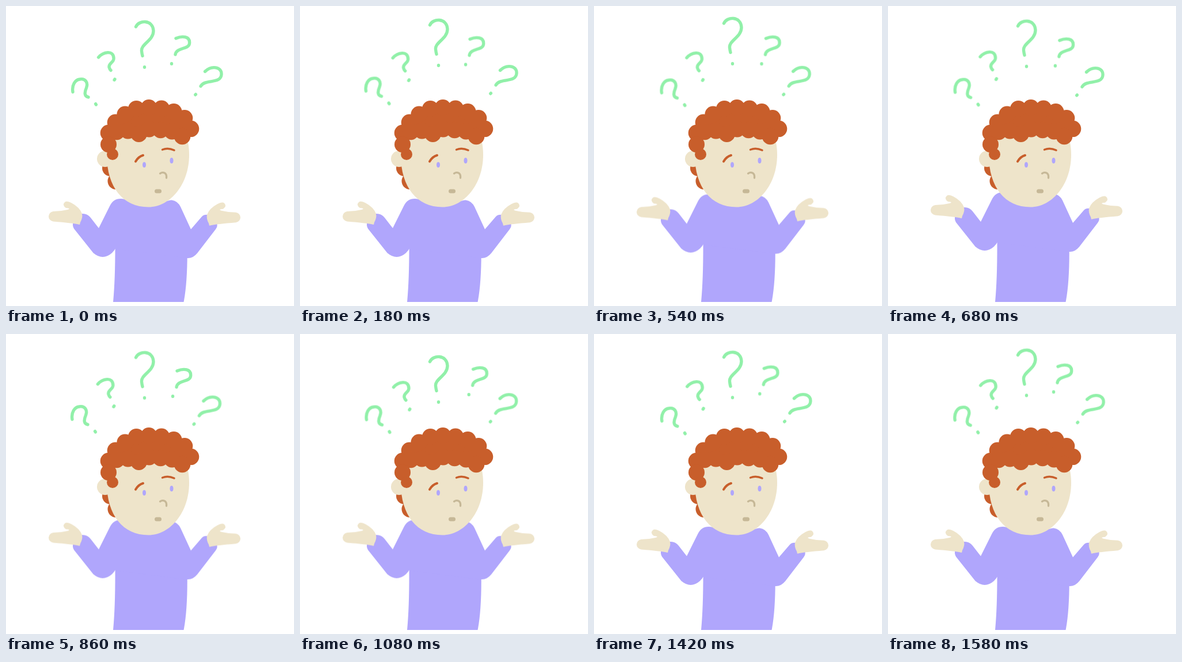
An HTML page that plays this animation: 500x520 px, repeating every 1.6 s.

```html
<!DOCTYPE html>
<html lang="en">
<head>
<meta charset="utf-8">
<title>Shrug</title>
<style>
  html, body { margin: 0; width: 100%; height: 100%; overflow: hidden; background: #fff; }
  svg { display: block; width: 500px; height: 520px; }
  .skin { fill: #eee4ca; }
  .hair { fill: #c85e2b; }
  .shirt { fill: #b0a6fc; }
  .line, .curls { stroke-linecap: round; stroke-linejoin: round; }
  .line { fill: none; }
  .brow { stroke: #c85e2b; }
  .nose { stroke: #c6b897; }
  .mark { stroke: #91f0a9; stroke-width: 5.4; }
  /* Zero-length round dashes make a row of evenly spaced curls */
  .curls { stroke: #c85e2b; stroke-width: 28.6; stroke-dasharray: 0 1; }
</style>
</head>
<body>
<svg viewBox="0 0 500 520">
  <defs>
    <path id="hand" d="M82 356Q95 356 107 353Q112 351.500 108 350.500L104 350Q97 345 102 340Q106 337 114 341.500Q128 349 132 360Q133.500 367 129 375L128 379Q115 376 82 373.500Q74 371.500 74 364.500Q75 357 82 356Z"/>
  </defs>
  <path class="shirt" d="M186 513Q190 470 189.500 405H314.500Q316 475 308.500 513Z"/>
  <g id="body">
    <path class="shirt" d="M180 347Q186 334 199 334Q206 334 213 338L280 338Q284 336 288 336.500Q298 338 303 348L321 387L340 365Q344 361 350 362L366 376Q368 382 364 387L332 428.500Q324 438 314.500 437L189.500 421Q188 424 184 428Q168 442 151.500 428L118 386Q114.500 380 117 374L131 360Q141 359 147 367L161 385Z"/>
    <use href="#hand" class="skin"/>
    <use href="#hand" class="skin" transform="matrix(-1 0 0 1 481 1.8)"/>
  </g>
  <g class="hair">
    <circle cx="181" cy="281" r="14"/>
    <circle cx="191" cy="303.500" r="14.500"/>
  </g>
  <circle class="skin" cx="172" cy="265" r="14"/>
  <path class="skin" d="M247 348.500C203 348.500 175 314 175 258C175 208 208 168 247 168C286 168 318 208 318 258C318 308 286 348.500 247 348.500Z"/>
  <g class="hair">
    <path class="curls" pathLength="8.010" d="M178 220C183 208 198 188 227 178C262 172 315 181 321 213"/>
    <path class="curls" pathLength="6.010" d="M306 226L288 217L249 213L230 222L208 215L192 218"/>
    <circle cx="178" cy="240" r="14"/>
    <circle cx="185" cy="257" r="10"/>
  </g>
  <ellipse class="shirt" cx="240" cy="275.300" rx="3" ry="4.700"/>
  <ellipse class="shirt" cx="287.500" cy="268" rx="3" ry="4.900"/>
  <path class="line brow" stroke-width="4" d="M225 269.500Q230 261 238 258.800"/>
  <path class="line brow" stroke-width="3.500" d="M271.500 249Q281 245 292 250"/>
  <path class="line nose" stroke-width="3.300" d="M267.500 290.300C272 287 279.500 288.500 278.500 298"/>
  <path class="line nose" stroke-width="7" d="M261.500 321H266.500"/>
  <g id="marks" class="line mark">
    <path d="M116 149C114 137 120 128 128 127C138 125 143 133 139.500 142C136 150 136 157 143 158M155.600 169.700l.8 1.200"/>
    <path d="M160.500 89C168 80 187 75 187 91C187 98 178 99 179 106Q180 110 182 111.500M188.900 126.800l-.8 1.400"/>
    <path d="M225.500 36C230.500 24 255 23 256 43C256 60 234 66 235.500 78Q236 83 237 86.500M240.500 105.700v.6"/>
    <path d="M295 56C306 51.500 320 52 318.500 65C317 76 296 71 294 84M287.500 99.700v.6"/>
    <path d="M345.500 113.500C356 103 374.500 104.500 374 118.500C373 136 345 126 338 139M329.300 153.200l-.6 .6"/>
  </g>
</svg>
<script>
const LOOP = 1600;

// Each key is [ms, x, y]; every part starts and ends the loop at rest.
function move(el, keys, easing = 'linear') {
  const frames = [[0, 0, 0], ...keys, [LOOP, 0, 0]].map(([t, x, y]) => ({
    offset: t / LOOP, transform: `translate(${x}px, ${y}px)`, easing
  }));
  el.animate(frames, { duration: LOOP, iterations: Infinity });
}

// Swing along one direction between turning points [ms, distance].
const swing = (dx, dy, ...turns) => turns.map(([t, d]) => [t, d * dx, d * dy]);

const drifts = [
  swing(1, 1, [240, -2], [560, 1.7], [980, -2.2], [1300, 3.1]),
  swing(.5, .87, [400, 2.7], [840, -3], [1160, 6]),
  swing(0, 1, [480, -8], [1080, 12]),
  [[180, 0, 1.5], [540, 3.5, .2], [860, 2, 8], [1080, 5.7, 5], [1280, .5, 6.5]],
  swing(1, -1, [250, 2.8], [860, -2.6], [1210, 4.1])
];
[...document.getElementById('marks').children].forEach((mark, i) => move(mark, drifts[i]));

// Shoulders rise, hold, then drop.
const LIFT = -11.7;
move(document.getElementById('body'),
  swing(0, 1, [200, 0], [780, LIFT], [1080, LIFT], [1410, 0]), 'ease-in-out');
</script>
</body>
</html>
```
